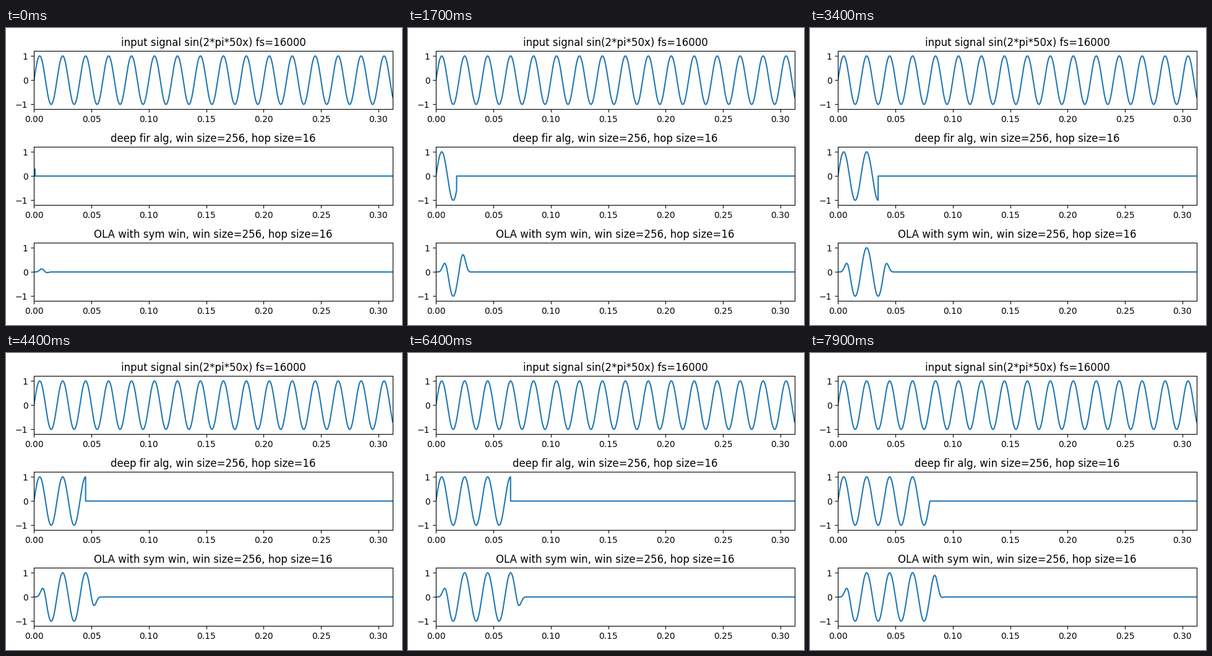
Recreate the animation shown at these times as a matplotlib script. Size 640 by 480 pixels, loop 8 s.

```python
import numpy as np
import matplotlib.pyplot as plt
from matplotlib.animation import FuncAnimation

FS = 16000
TOTAL = 5000
WIN = 256
HOP = 16
FRAMES = 80

t = np.arange(TOTAL) / FS
signal = np.sin(2 * np.pi * 50 * t)

# Hann applied at analysis and synthesis, scaled so the overlaps sum to one
window = np.hanning(WIN) ** 2
window *= HOP / window.sum()


def fir_output(step):
    """Samples released so far, one hop per step."""
    return np.where(np.arange(TOTAL) < HOP * (step + 1), signal, 0)


def ola_output(step):
    """Sum of all windowed blocks up to this step."""
    gain = np.zeros(TOTAL)
    for start in range(0, HOP * (step + 1), HOP):
        gain[start:start + WIN] += window
    return gain * signal


fig, axes = plt.subplots(3, 1, figsize=(6.4, 4.8), dpi=100)
titles = (
    "input signal sin(2*pi*50x) fs=16000",
    f"deep fir alg, win size={WIN}, hop size={HOP}",
    f"OLA with sym win, win size={WIN}, hop size={HOP}",
)
lines = []
for ax, title, data in zip(axes, titles, (signal, fir_output(0), ola_output(0))):
    lines += ax.plot(t, data)
    ax.set_title(title)
    ax.set_xlim(0, TOTAL / FS)
    ax.set_ylim(-1.2, 1.2)
fig.tight_layout()


def update(step):
    lines[1].set_ydata(fir_output(step))
    lines[2].set_ydata(ola_output(step))
    return lines[1:]


anim = FuncAnimation(fig, update, frames=FRAMES, interval=100,
                     init_func=lambda: update(0), repeat=True, repeat_delay=0)
plt.show()
```
